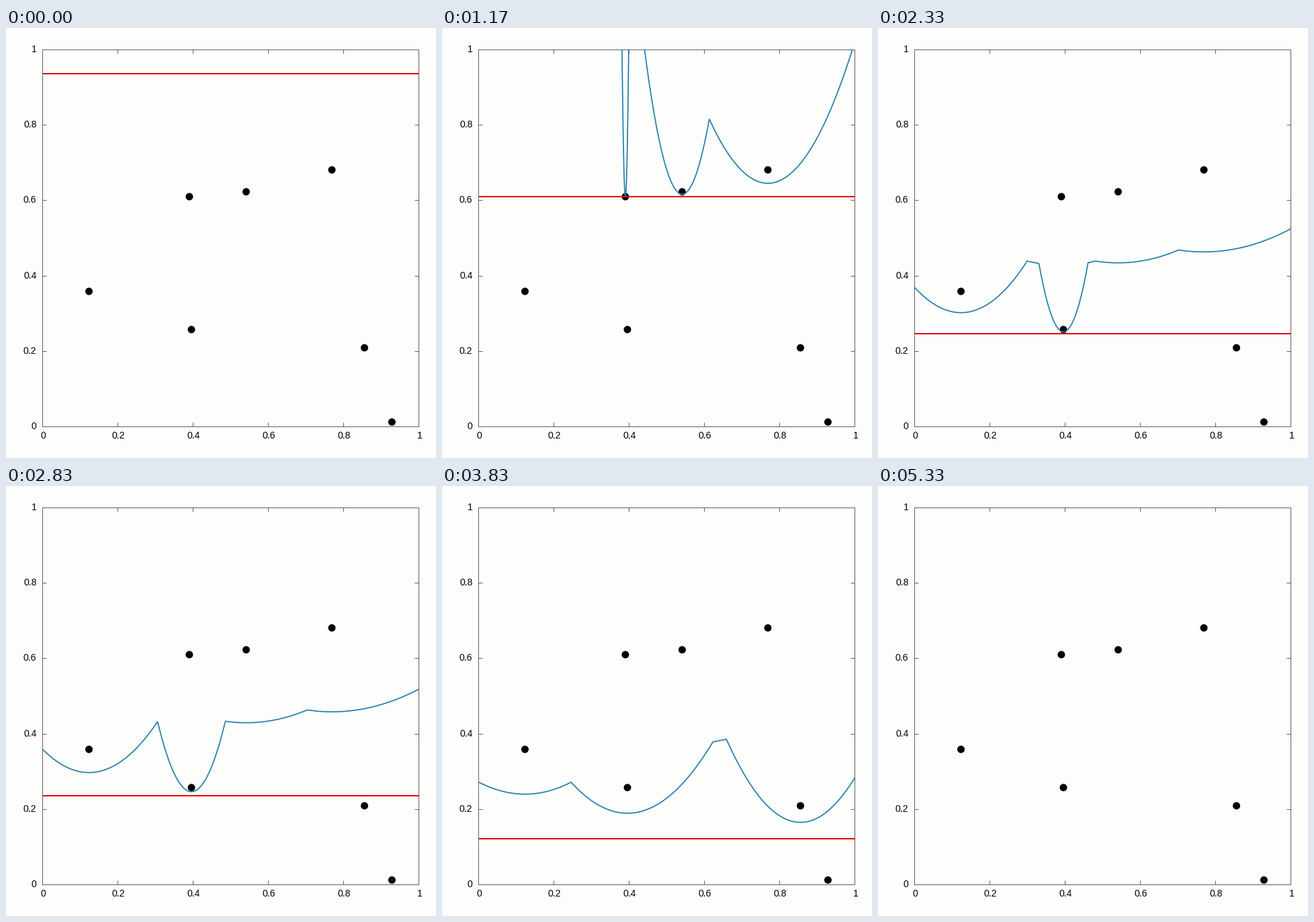
Recreate the animation shown at these times as a matplotlib script. Size 640x640 px, loop 5410 ms.

```python
from itertools import combinations

import numpy as np
import matplotlib.pyplot as plt
from matplotlib.animation import FuncAnimation
from matplotlib.patches import Circle, Rectangle

SIZE, DPI = 640, 100
POSES, HOLD, LOOP_MS = 65, 4, 5410
FRAMES = POSES * HOLD
PT = 72 / DPI

PAPER, FRAME, BLUE, RED = "#fdfdfc", "#60605c", "#207ea8", "#e60a0a"

SITES = np.array([
    (0.7688, 0.6815), (0.5410, 0.6234), (0.3900, 0.6105), (0.1232, 0.3592),
    (0.3955, 0.2579), (0.8554, 0.2095), (0.9284, 0.0125),
])
STEPS = 10  # sweep steps from one event to the next


def px(x):
    return 54.5 + 560 * x


def py(y):
    return 593.5 - 561 * y


def circle_events():
    """Lowest points of all circles through three sites with none inside."""
    for a, b, c in combinations(SITES, 3):
        center = np.linalg.solve(2 * np.array([b - a, c - a]),
                                 [b @ b - a @ a, c @ c - a @ a])
        radius = np.hypot(*(a - center))
        if np.hypot(*(SITES - center).T).min() > radius - 1e-9:
            yield center[1] - radius


EVENTS = sorted([1, *SITES[:, 1], *circle_events()], reverse=True)


def sweep_height(pose):
    step = np.floor(np.interp(pose, [0, 39, POSES], [2, 92.1, 150.8]))
    return np.interp(step / STEPS, np.arange(len(EVENTS)), EVENTS)


def beach_line(x, d):
    """Lower envelope of the parabolas of all sites above the sweep line."""
    active = SITES[SITES[:, 1] - d > 1e-6]
    if not len(active):
        return np.full_like(x, np.nan)
    sx, sy = active[:, :1], active[:, 1:]
    return ((x - sx) ** 2 / (2 * (sy - d)) + (sy + d) / 2).min(axis=0)


fig = plt.figure(figsize=(SIZE / DPI, SIZE / DPI), dpi=DPI, facecolor=PAPER)
ax = fig.add_axes([0, 0, 1, 1])
ax.set(xlim=(0, SIZE), ylim=(SIZE, 0))
ax.axis("off")


def stroke(xs, ys, color=FRAME, width=1, z=1, snap=False):
    return ax.plot(xs, ys, color=color, lw=width * PT, zorder=z, snap=snap,
                   solid_capstyle="butt", solid_joinstyle="miter")[0]


def label(x, y, text, align):
    ax.text(x, y, text, ha=align, va="baseline", color="black",
            family="Liberation Sans", fontsize=14 * PT)


left, right, top, bottom = px(0), px(1), py(1), py(0)
ax.add_patch(Rectangle((left, top), right - left, bottom - top, fill=False,
                       ec=FRAME, lw=PT, zorder=1, snap=False))

for v in np.arange(6) / 5:
    x, y = np.floor(px(v)) + 0.5, np.floor(py(v)) + 0.5
    for edge, inward in ((bottom, -6), (top, 6)):
        stroke([x, x], [edge, edge + inward])
    for edge, inward in ((left, 6), (right, -6)):
        stroke([edge, edge + inward], [y, y])
    label(px(v) + 1, 611, f"{v:g}", "center")
    label(45.5, py(v) + 3.5, f"{v:g}", "right")

for x, y in SITES:
    ax.add_patch(Circle((px(x), py(y)), 5.5, fc="black", lw=0, zorder=2))

xs = np.linspace(0, 1, 1001)
beach = stroke(px(xs), np.full_like(xs, np.nan), BLUE, 1.7, 3)
sweep = stroke([left, right], [0, 0], RED, 2, 4, snap=True)
for line in (beach, sweep):
    line.set_clip_path(Rectangle((left - 0.5, top - 0.5), right - left + 1,
                                 bottom - top + 1, transform=ax.transData))


def update(i):
    d = sweep_height((i + 1) // HOLD)
    beach.set_ydata(py(np.minimum(beach_line(xs, d), 5)))
    sweep.set_ydata([py(d)] * 2)
    return beach, sweep


anim = FuncAnimation(fig, update, frames=FRAMES, interval=LOOP_MS / FRAMES,
                     repeat=True, repeat_delay=0, blit=False)
plt.show()
```
